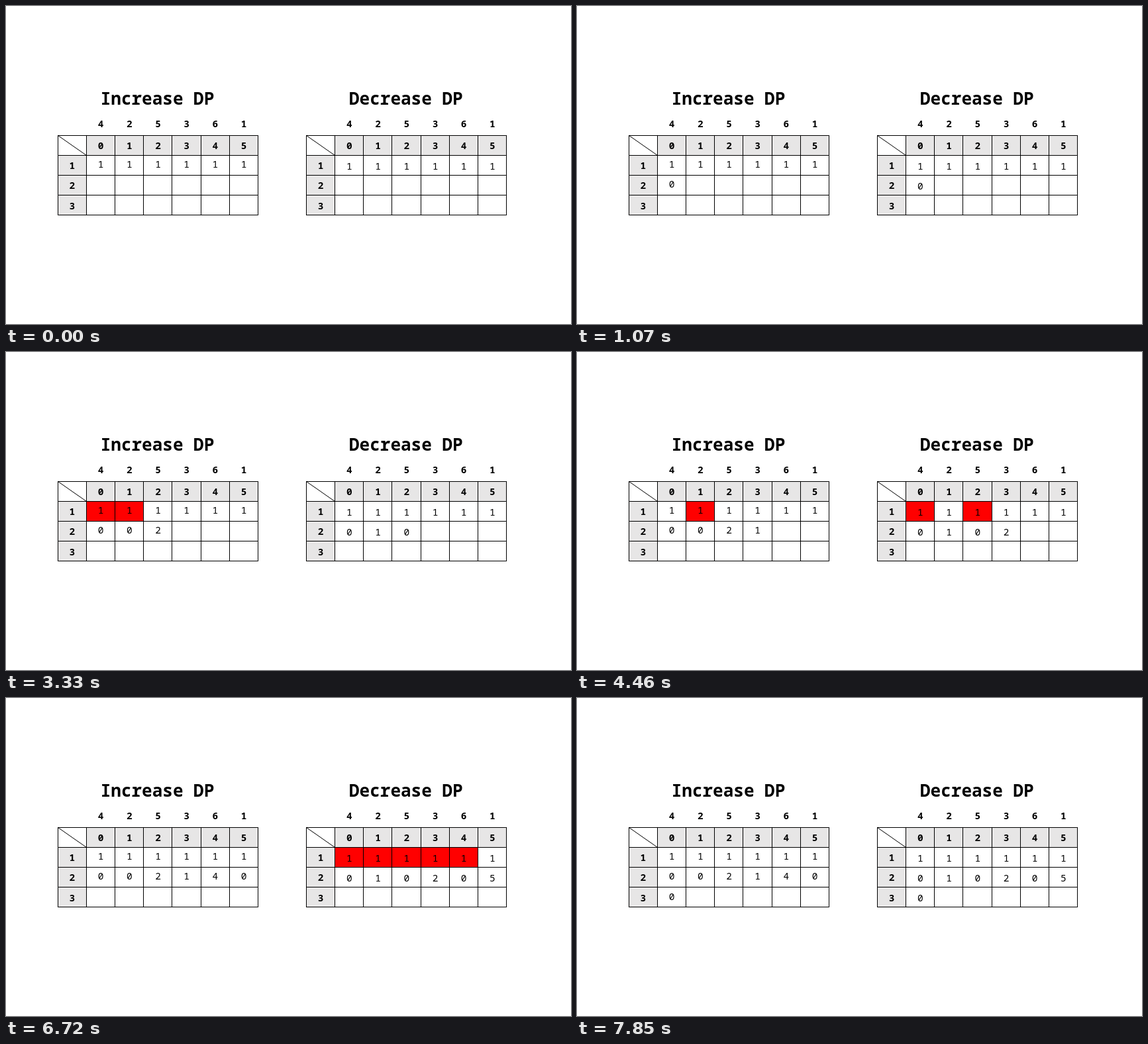
An HTML page that plays this animation: 853 px wide and 480 px high, repeating every 8 s.

```html
<!DOCTYPE html>
<html lang="en">
<head>
<meta charset="utf-8">
<style>
  html, body { margin: 0; width: 100%; height: 100%; overflow: hidden; background: #fff; }
  svg { display: block; font-family: "Noto Sans Mono", monospace; }
  text { text-anchor: middle; font-size: 14.5px; }
  .bold { font-weight: 700; }
  .title { font-weight: 700; font-size: 26px; }
  rect, .rule { stroke: #000; stroke-width: 1; }
</style>
</head>
<body>
<svg id="stage" width="853" height="480" viewBox="0 0 853 480"></svg>
<script>
const LOOP = 8000, FIRST_STEP = 1070, STEP = 1130;
const COL = 43.2, ROW = 30.1, TOP = 195;
const GREY = '#e7e6e6', RED = '#f00', WHITE = '#fff';
const values = [4, 2, 5, 3, 6, 1];
const stage = document.getElementById('stage');

function add(tag, attrs, content = '') {
  const node = document.createElementNS('http://www.w3.org/2000/svg', tag);
  for (const name in attrs) node.setAttribute(name, attrs[name]);
  node.textContent = content;
  return stage.appendChild(node);
}

function label(x, y, content, style = '') {
  return add('text', { x, y, class: style }, content);
}

function makeTable(left, title, dataShift, precedes) {
  const edgeX = c => Math.floor(left + c * COL) + 0.5;
  const edgeY = r => Math.floor(TOP + r * ROW) + 0.5;
  const midX = c => left + 0.3 + (c + 0.5) * COL;
  const baseline = r => 216.2 + r * ROW;
  const topCells = [], results = [];

  for (let r = 0; r < 4; r++) {
    for (let c = 0; c < 7; c++) {
      const header = (r === 0) !== (c === 0);
      const cell = add('rect', {
        x: edgeX(c), y: edgeY(r),
        width: edgeX(c + 1) - edgeX(c), height: edgeY(r + 1) - edgeY(r),
        fill: header ? GREY : WHITE
      });
      if (r === 1 && c > 0) topCells.push(cell);
    }
  }
  add('line', { x1: edgeX(0), y1: edgeY(0), x2: edgeX(1), y2: edgeY(1), class: 'rule' });
  label(left + 150.5, 149, title, 'title');
  for (let r = 1; r < 4; r++) label(midX(0), baseline(r), r, 'bold');

  // For each column, the earlier columns whose counts are summed.
  const sources = values.map((v, i) =>
    values.map((_, j) => j).filter(j => j < i && precedes(values[j], v)));

  values.forEach((v, i) => {
    const x = midX(i + 1);
    label(x, 183.3, v, 'bold');
    label(x, baseline(0), i, 'bold');
    label(x, baseline(1) + dataShift, 1);
    results.push(label(x, baseline(2) + dataShift, sources[i].length));
  });
  results.push(label(midX(1), baseline(3) + dataShift, 0));

  return step => {
    results.forEach((node, i) => node.setAttribute('visibility', i < step ? 'visible' : 'hidden'));
    const active = sources[step - 1] || [];
    topCells.forEach((cell, j) => cell.setAttribute('fill', active.includes(j) ? RED : WHITE));
  };
}

const tables = [
  makeTable(78, 'Increase DP', -2, (a, b) => a < b),
  makeTable(453.3, 'Decrease DP', 0.4, (a, b) => a > b)
];

const start = performance.now();
function draw() {
  const t = (performance.now() - start) % LOOP;
  const step = t < FIRST_STEP ? 0 : 1 + Math.floor((t - FIRST_STEP) / STEP);
  tables.forEach(show => show(step));
  requestAnimationFrame(draw);
}
draw();
</script>
</body>
</html>
```
